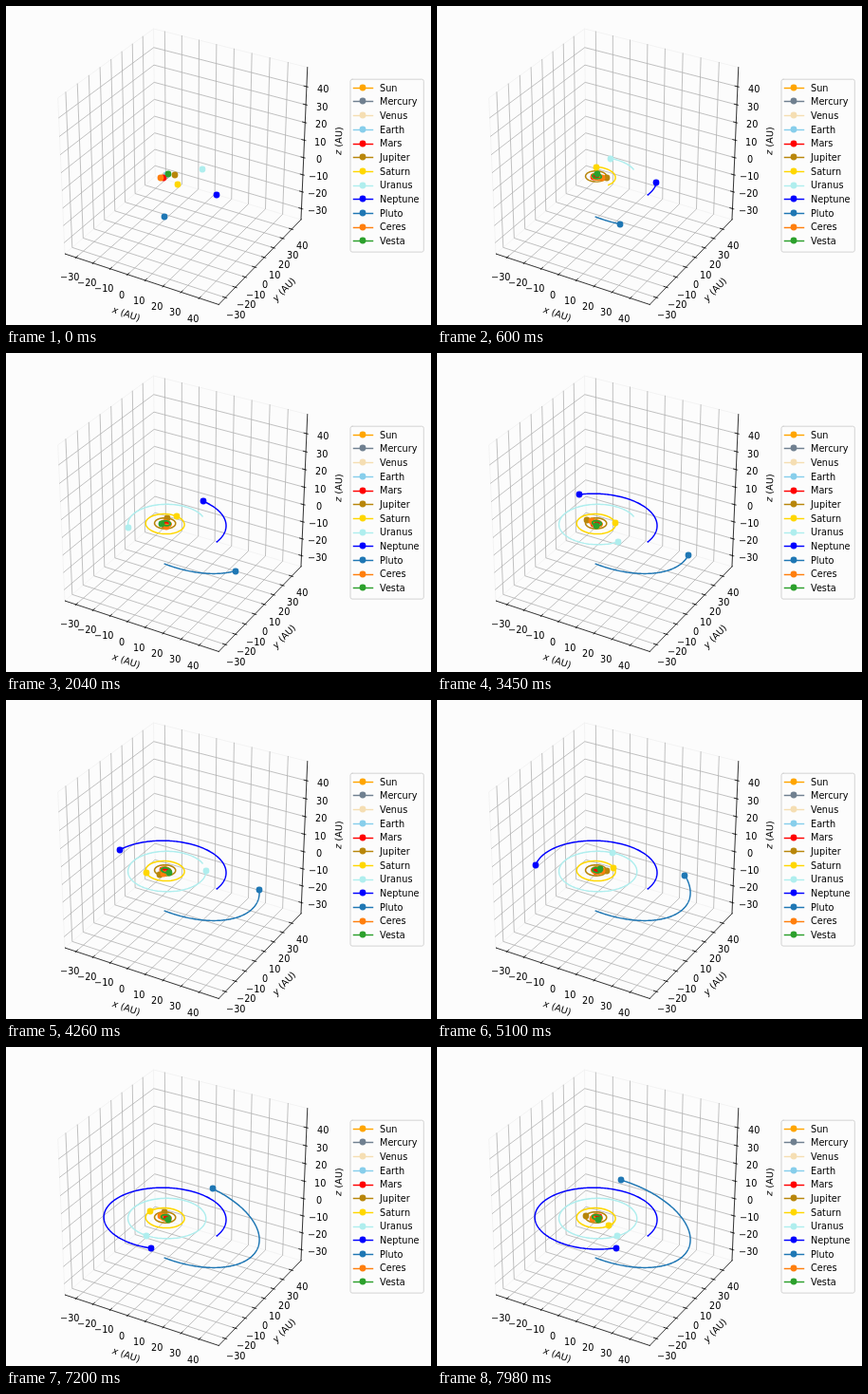
Write an HTML page with a canvas that moves like this. It is 448 by 336 pixels and loops after 8 s.

```html
<!DOCTYPE html>
<html lang="en">
<head>
<meta charset="utf-8">
<title>Orbits</title>
<style>
html, body { margin: 0; width: 100%; height: 100%; overflow: hidden; background: #fcfcfc; }
canvas { display: block; }
</style>
</head>
<body>
<canvas id="stage" width="448" height="336"></canvas>
<script>
const LOOP = 8000, STEP_MS = 30, STEP_DAYS = 202.4, START_DAY = 8766;
const FRAMES = Math.ceil(LOOP / STEP_MS);
const FONT = '9.72px "DejaVu Sans", sans-serif';
const RAD = Math.PI / 180;

// a (AU), eccentricity, inclination, mean longitude, perihelion, node (degrees, J2000)
const bodies = [
  ['Sun', '#ffa500', 0],
  ['Mercury', '#708090', 0.3871, 0.2056, 7.005, 252.25, 77.458, 48.331],
  ['Venus', '#f5deb3', 0.7233, 0.0068, 3.395, 181.979, 131.602, 76.68],
  ['Earth', '#87ceeb', 1, 0.0167, 0, 100.464, 102.937, 0],
  ['Mars', '#ff0000', 1.5237, 0.0934, 1.85, 355.447, 336.056, 49.56],
  ['Jupiter', '#b8860b', 5.2012, 0.0484, 1.304, 34.396, 14.728, 100.474],
  ['Saturn', '#ffd700', 9.5367, 0.0539, 2.486, 49.954, 92.599, 113.662],
  ['Uranus', '#afeeee', 19.16, 0.0473, 0.773, 313.238, 170.954, 74.017],
  ['Neptune', '#0000ff', 30.03, 0.0086, 1.77, 304.88, 44.965, 131.784],
  ['Pluto', '#1f77b4', 39.23, 0.2488, 17.14, 238.929, 224.069, 110.304],
  ['Ceres', '#ff7f0e', 2.7675, 0.0758, 10.59, 160.9, 153.8, 80.3],
  ['Vesta', '#2ca02c', 2.3615, 0.0902, 7.14, 233.6, 255, 103.8]
].map(([name, color, ...orbit]) => ({ name, color, orbit }));

// Camera at elevation 30, azimuth -60, looking at a cube of half side H
const H = 0.55, MID = 6.97, UNIT = 0.01262;
const C30 = Math.sqrt(3) / 2;
const TICKS = [-30, -20, -10, 0, 10, 20, 30, 40];

function project([x, y, z]) {
  const right = C30 * x + 0.5 * y;
  const up = -0.25 * x + C30 / 2 * y + C30 * z;
  const scale = 1702 / (10 - (C30 / 2 * x - 0.75 * y + 0.5 * z));
  return [188.6 + right * scale, 163.8 - up * scale];
}

const toBox = v => (v - MID) * UNIT;

function orbitPoint([a, e, inc, L, peri, node], day) {
  if (!a) return [0, 0, 0];
  const M = (L - peri + 0.9856077 * Math.pow(a, -1.5) * day) * RAD;
  let E = M;
  for (let i = 0; i < 8; i++) E -= (E - e * Math.sin(E) - M) / (1 - e * Math.cos(E));
  const px = a * (Math.cos(E) - e), py = a * Math.sqrt(1 - e * e) * Math.sin(E);
  const r = Math.hypot(px, py);
  const u = Math.atan2(py, px) + (peri - node) * RAD;
  const n = node * RAD, ci = Math.cos(inc * RAD), si = Math.sin(inc * RAD);
  return [
    r * (Math.cos(n) * Math.cos(u) - Math.sin(n) * Math.sin(u) * ci),
    r * (Math.sin(n) * Math.cos(u) + Math.cos(n) * Math.sin(u) * ci),
    r * Math.sin(u) * si
  ];
}

for (const b of bodies) {
  b.path = Array.from({ length: FRAMES }, (_, k) =>
    project(orbitPoint(b.orbit, START_DAY + k * STEP_DAYS).map(toBox)));
}

function polyline(g, pts, color, width) {
  g.strokeStyle = color;
  g.lineWidth = width;
  g.lineCap = 'square';
  g.lineJoin = 'round';
  g.beginPath();
  pts.forEach(p => g.lineTo(p[0], p[1]));
  g.stroke();
}

// Markers and upright text sit on whole pixels
function dot(g, [x, y], color) {
  g.fillStyle = color;
  g.beginPath();
  g.arc(Math.round(x), Math.round(y), 3.4, 0, 2 * Math.PI);
  g.fill();
}

function label(g, text, x, y) {
  g.fillText(text, Math.round(x), Math.round(y));
}

function drawGrid(g) {
  const panes = [
    [[-H, -H, -H], [-H, H, -H], [-H, H, H], [-H, -H, H], [-H, -H, -H]],
    [[-H, H, -H], [H, H, -H], [H, H, H], [-H, H, H]],
    [[-H, -H, -H], [H, -H, -H], [H, H, -H]]
  ];
  panes.forEach(p => polyline(g, p.map(project), '#f3f3f3', 0.97));
  for (const tick of TICKS) {
    const v = toBox(tick);
    const lines = [
      [[v, -H, -H], [v, H, -H], [v, H, H]],
      [[H, v, -H], [-H, v, -H], [-H, v, H]],
      [[-H, -H, v], [-H, H, v], [H, H, v]]
    ];
    lines.forEach(l => polyline(g, l.map(project), '#b0b0b0', 0.78));
  }
}

// at(v, o): point at value v on the axis, pushed o away from the cube
// tick(v, o): same, but moved along the tick direction only
const axes = [
  { name: 'x', at: (v, o) => [v, -H - o, -H - o], tick: (v, o) => [v, -H - o, -H] },
  { name: 'y', at: (v, o) => [H + o, v, -H - o], tick: (v, o) => [H + o, v, -H] },
  { name: 'z', at: (v, o) => [H + o, H + o, v], tick: (v, o) => [H + o, H, v] }
];

function drawAxis(g, { name, at, tick }) {
  const ends = [project(at(-H, 0)), project(at(H, 0))];
  polyline(g, ends, '#000', 0.78);
  g.fillStyle = '#000';
  g.font = FONT;
  for (const value of TICKS) {
    const v = toBox(value);
    polyline(g, [project(tick(v, 0.009)), project(tick(v, -0.018))], '#000', 0.78);
    const [x, y] = project(at(v, 0.075));
    const text = String(value).replace('-', '\u2212');
    label(g, text, x - g.measureText(text).width / 2, y + 7.7);
  }
  const [x, y] = project(at(0, 0.163));
  g.save();
  g.translate(x, y);
  g.rotate(Math.atan2(ends[1][1] - ends[0][1], ends[1][0] - ends[0][0]));
  const rest = ' (AU)', restWidth = g.measureText(rest).width;
  g.font = 'italic ' + FONT;
  const w = g.measureText(name).width, left = -(w + restWidth) / 2;
  g.fillText(name, left, 3.2);
  g.font = FONT;
  g.fillText(rest, left + w, 3.2);
  g.restore();
}

function drawLegend(g) {
  g.strokeStyle = '#d2d2d2';
  g.lineWidth = 0.97;
  g.beginPath();
  g.roundRect(363, 77.2, 77.3, 181.9, 2);
  g.stroke();
  g.font = FONT;
  bodies.forEach(({ name, color }, i) => {
    const y = 85.8 + i * 14.68;
    const mid = Math.round(y) + 0.5;
    polyline(g, [[366.5, mid], [386.5, mid]], color, 1.46);
    dot(g, [376.4, y], color);
    g.fillStyle = '#000';
    label(g, name, 394, y + 3.7);
  });
}

function makeBackdrop() {
  const c = document.createElement('canvas');
  c.width = 448;
  c.height = 336;
  const g = c.getContext('2d');
  g.fillStyle = '#fcfcfc';
  g.fillRect(0, 0, 448, 336);
  drawGrid(g);
  axes.forEach(a => drawAxis(g, a));
  drawLegend(g);
  return c;
}

const ctx = document.getElementById('stage').getContext('2d');
const backdrop = makeBackdrop();
const start = performance.now();

function draw(now) {
  const t = Math.max(0, now - start) % LOOP;
  const k = Math.min(FRAMES - 1, Math.floor(t / STEP_MS));
  ctx.drawImage(backdrop, 0, 0);
  for (const { path, color } of bodies) {
    if (k) polyline(ctx, path.slice(0, k + 1), color, 1.46);
    dot(ctx, path[k], color);
  }
  requestAnimationFrame(draw);
}
draw(start);
</script>
</body>
</html>
```
